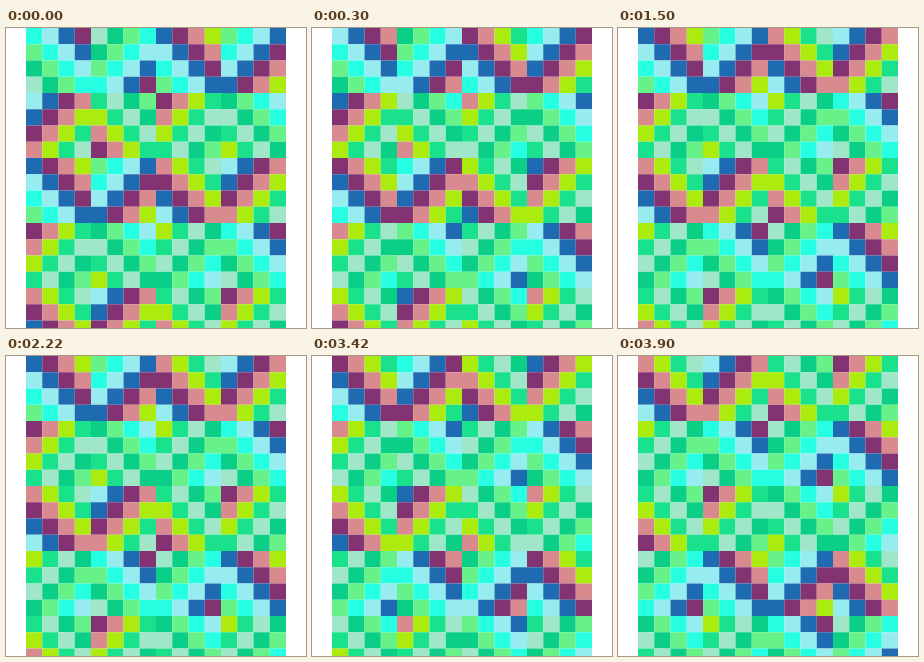
Recreate the animation shown at these times as an HTML page with a canvas. Size 300x300 px, loop 4800 ms.

```html
<!DOCTYPE html>
<html lang="en">
<head>
<meta charset="utf-8">
<title>Cycling tiles</title>
<style>
  html, body { margin: 0; width: 100%; height: 100%; overflow: hidden; background: #fff; }
  canvas { display: block; width: 300px; height: 300px; }
</style>
</head>
<body>
<canvas id="stage" width="300" height="300"></canvas>
<script>
const LOOP = 4800, STEP = 1200, LEAD = 900;
const LEFT = 20, CELL = 16.25, COLS = 16, ROWS = 19;
const COLORS = [
  '#843372', '#d88a8e', '#abec0e', '#1ae18b', '#9fe7c8',
  '#0bcf86', '#66f289', '#26ffe2', '#97ecef', '#1e6bb1'
];
const CORNERS = [[7, 4], [8, 3]];
const ctx = document.getElementById('stage').getContext('2d');

// Tiles of 4 x 4 cells: colours climb to the right, and rise or fall by row in a checkerboard.
function phase(col, row) {
  const tx = col >> 2, ty = row >> 2;
  const slope = (tx + ty) & 1 ? 1 : -1;
  const corner = CORNERS[ty & 1][tx & 1] + 2 * (tx >> 1) + 2 * (ty >> 1);
  return corner + (col & 3) + slope * (row & 3);
}

function draw(step) {
  ctx.fillStyle = '#fff';
  ctx.fillRect(0, 0, 300, 300);
  for (let row = 0; row < ROWS; row++) {
    for (let col = 0; col < COLS; col++) {
      ctx.fillStyle = COLORS[(phase(col, row) + step) % COLORS.length];
      ctx.fillRect(LEFT + col * CELL, row * CELL, CELL, CELL);
    }
  }
}

const start = performance.now();
let shown = -1;

function tick() {
  const time = (performance.now() - start) % LOOP;
  const step = Math.floor((time + LEAD) / STEP);
  if (step !== shown) draw(shown = step);
  requestAnimationFrame(tick);
}
tick();
</script>
</body>
</html>
```
